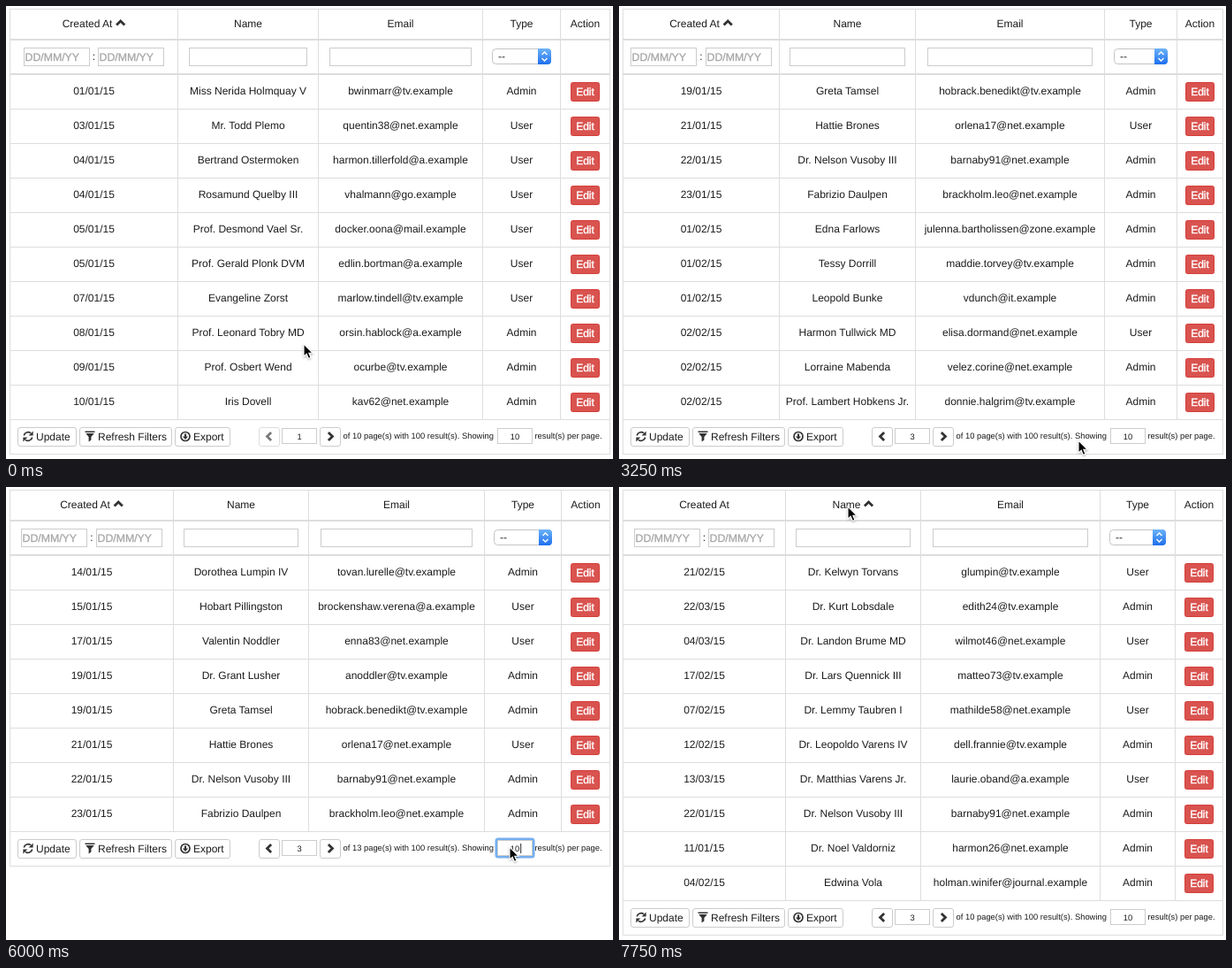
Recreate the animation shown at these times as an HTML page. Size 687 px wide and 512 px high, loop 8000 ms.

```html
<!DOCTYPE html>
<html lang="en">
<head>
<meta charset="utf-8">
<title>Paged user table</title>
<style>
  html, body { margin: 0; width: 100%; height: 100%; overflow: hidden; background: #fff; }
  svg { display: block; font: 12px "Liberation Sans", Arial, sans-serif; text-rendering: geometricPrecision; }
  text { fill: #1c1c1c; }
  .placeholder { fill: #a6a6a6; stroke: #a6a6a6; stroke-width: .3; font-size: 12.3px; }
  .edit { fill: #fff; stroke: #fff; stroke-width: .4; }
  .small { font-size: 9.4px; }
</style>
</head>
<body>
<svg id="stage" width="687" height="512" viewBox="0 0 687 512"></svg>
<script>
const LOOP = 8000, LEFT = 4, RIGHT = 683, TOP = 3, BODY = 77, ROW = 39;

const parse = text => text.trim().split('\n').map(line => {
  const [date, name, email, type] = line.trim().split('|');
  return [date + '/15', name, email, type];
});

const users = parse(`
  01/01|Miss Nerida Holmquay V|bwinmarr@tv.example|Admin
  03/01|Mr. Todd Plemo|quentin38@net.example|User
  04/01|Bertrand Ostermoken|harmon.tillerfold@a.example|User
  04/01|Rosamund Quelby III|vhalmann@go.example|User
  05/01|Prof. Desmond Vael Sr.|docker.oona@mail.example|User
  05/01|Prof. Gerald Plonk DVM|edlin.bortman@a.example|User
  07/01|Evangeline Zorst|marlow.tindell@tv.example|User
  08/01|Prof. Leonard Tobry MD|orsin.hablock@a.example|Admin
  09/01|Prof. Osbert Wend|ocurbe@tv.example|Admin
  10/01|Iris Dovell|kav62@net.example|Admin
  10/01|Mrs. Vera Dunnabey Jr.|tilda.branwick@net.example|User
  10/01|Orrin Tamke|fenner.nilda@a.example|User
  11/01|Dr. Noel Valdorniz|harmon26@net.example|Admin
  12/01|Mrs. Imogen Feldquist|rolf.bontwick@a.example|User
  12/01|Prof. Linna Yarb|dusty.wolkenbrand@tv.example|Admin
  13/01|Marlys Bockle IV|bernard.hoom@box.example|Admin
  14/01|Dorothea Lumpin IV|tovan.lurelle@tv.example|Admin
  15/01|Hobart Pillingston|brockenshaw.verena@a.example|User
  17/01|Valentin Noddler|enna83@net.example|User
  19/01|Dr. Grant Lusher|anoddler@tv.example|Admin
  19/01|Greta Tamsel|hobrack.benedikt@tv.example|Admin
  21/01|Hattie Brones|orlena17@net.example|User
  22/01|Dr. Nelson Vusoby III|barnaby91@net.example|Admin
  23/01|Fabrizio Daulpen|brackholm.leo@net.example|Admin
  01/02|Edna Farlows|julenna.bartholissen@zone.example|Admin
  01/02|Tessy Dorrill|maddie.torvey@tv.example|Admin
  01/02|Leopold Bunke|vdunch@it.example|Admin
  02/02|Harmon Tullwick MD|elisa.dormand@net.example|User
  02/02|Lorraine Mabenda|velez.corine@net.example|Admin
  02/02|Prof. Lambert Hobkens Jr.|donnie.halgrim@tv.example|Admin`);

const byName = [...parse(`
  21/02|Dr. Kelwyn Torvans|glumpin@tv.example|User
  22/03|Dr. Kurt Lobsdale|edith24@tv.example|Admin
  04/03|Dr. Landon Brume MD|wilmot46@net.example|User
  17/02|Dr. Lars Quennick III|matteo73@tv.example|Admin
  07/02|Dr. Lemmy Taubren I|mathilde58@net.example|User
  12/02|Dr. Leopoldo Varens IV|dell.frannie@tv.example|Admin
  13/03|Dr. Matthias Varens Jr.|laurie.oband@a.example|User`),
  users[22], users[12],
  ...parse('04/02|Edwina Vola|holman.winifer@journal.example|Admin')];

// Column edges, then the spans of the name and email filters.
const view = (rows, edges, nameSpan, emailSpan, pages = 10, sorted = 0) =>
  ({ rows, edges: [LEFT, ...edges, RIGHT], nameSpan, emailSpan, pages, sorted });
const midEdges = [189, 342, 541, 628], midName = [201, 331], midEmail = [356, 528];
const page1 = view(users.slice(0, 10), [194, 353, 539, 627], [207, 341], [366, 527]);
const page2 = view(users.slice(10, 20), midEdges, midName, midEmail);
const page3 = view(users.slice(20, 30), [181, 335, 549, 631], [193, 324], [349, 536]);
const eights = view(users.slice(16, 24), midEdges, midName, midEmail, 13);
const sorted = view(byName, [188, 341, 544, 629], [200, 330], [355, 531], 10, 1);

const steps = [
  [0, { view: page1, page: 1, size: '10', busy: false, focus: false, cursor: [337, 382] }],
  [250, { cursor: [339, 396] }],
  [500, { cursor: [346, 430] }],
  [750, { cursor: [357, 472] }],
  [1000, { cursor: [363, 491] }],
  [1250, { page: 2, busy: true }],
  [1500, { cursor: [362, 495] }],
  [1750, { view: page2, busy: false }],
  [2000, { cursor: [367, 495] }],
  [2500, { page: 3, busy: true }],
  [2750, { view: page3, busy: false }],
  [3000, { cursor: [420, 494] }],
  [3250, { cursor: [520, 491] }],
  [3500, { cursor: [565, 490], focus: true }],
  [4000, { size: '8' }],
  [4250, { busy: true, focus: false }],
  [4500, { view: eights, busy: false }],
  [4750, { cursor: [568, 450] }],
  [5000, { cursor: [571, 409] }],
  [5250, { cursor: [570, 407], focus: true }],
  [5500, { size: '1' }],
  [6000, { size: '10' }],
  [6250, { busy: true, focus: false }],
  [6500, { view: page3, busy: false, cursor: [510, 340] }],
  [6750, { cursor: [360, 130] }],
  [7000, { cursor: [265, 30] }],
  [7500, { cursor: [260, 23], busy: true }],
  [7750, { view: sorted, busy: false, cursor: [259, 22] }]
];

const rect = (x, y, w, h, fill) => `<rect x="${x}" y="${y}" width="${w}" height="${h}" fill="${fill}"/>`;
const box = (x, y, w, h, stroke = '#ccc', r = 0, fill = '#fff') =>
  `<rect x="${x + .5}" y="${y + .5}" width="${w - 1}" height="${h - 1}" rx="${r}" fill="${fill}" stroke="${stroke}"/>`;
const text = (x, y, s, style = '') => `<text x="${x}" y="${y}" class="${style}">${s}</text>`;
const centred = (x, y, s, style = '') => `<g text-anchor="middle">${text(x, y, s, style)}</g>`;
const group = (content, opacity) => `<g opacity="${opacity}">${content}</g>`;
const icon = (x, y, content, turn = 0) => `<g transform="translate(${x} ${y}) rotate(${turn})">${content}</g>`;

const chevron = '<path d="M-4.6 2.1L0-2.5 4.6 2.1" fill="none" stroke="#333" stroke-width="2.8"/>';
const halfTurn = '<path d="M-4.7-1A4.8 4.8 0 0 1 3-3.8" fill="none" stroke="#333" stroke-width="1.7"/><path d="M5.6-6V-1H.6Z" fill="#333"/>';
const refreshIcon = halfTurn + `<g transform="rotate(180)">${halfTurn}</g>`;
const filterIcon = '<path d="M-5.5-6H5.5V-4.6H-5.5ZM-4.8-3.6H4.8L1.4 .6V4L-1.4 6V.6Z" fill="#333"/>';
const exportIcon = '<circle r="5" fill="none" stroke="#333" stroke-width="1.7"/><path d="M-1.1-3H1.1V0H3.1L0 3.4-3.1 0H-1.1Z" fill="#333"/>';

function selectBox(centre, colWidth, busy) {
  const w = colWidth - 21, x = Math.floor(centre - w / 2), end = x + w;
  const blue = `<path d="M${end - 15} 48H${end - 4}Q${end} 48 ${end} 52V62Q${end} 66 ${end - 4} 66H${end - 15}Z" fill="url(#blue)"/>`;
  return box(x, 48, w, 18, '#c4c4c4', 4) + (busy ? '' : blue) + text(x + 7, 61, '--') +
    `<path d="M${end - 10.5} 55l3-3 3 3m0 4l-3 3-3-3" fill="none" stroke="${busy ? '#777' : '#fff'}" stroke-width="1.4"/>`;
}

function head({ edges, nameSpan, emailSpan, sorted }, centres, busy) {
  const titles = ['Created At', 'Name', 'Email', 'Type', 'Action'];
  const halfWidths = [28.7, 16];
  let out = titles.map((title, i) => i === sorted
    ? centred(centres[i] - 7.5, 24, title) + icon(centres[i] + halfWidths[i] + 1.5, 19.5, chevron)
    : centred(centres[i], 24, title)).join('');

  const mid = centres[0];
  for (const x of [Math.ceil(mid) - 80, Math.floor(mid) + 5])
    out += box(x, 47, 75, 21) + text(x + 1.5, 61.5, 'DD/MM/YY', 'placeholder');
  out += centred(mid, 61, ':');
  for (const [a, b] of [nameSpan, emailSpan]) out += box(a, 47, b - a, 21);
  return out + selectBox(centres[3], edges[4] - edges[3], busy);
}

function body(rows, centres) {
  return rows.map((row, r) => {
    const y = BODY + r * ROW, x = Math.round(centres[4] - 17);
    return row.map((s, i) => centred(centres[i], y + 23, s)).join('') +
      box(x, y + 9, 33, 22, '#d43f3a', 2, '#d9534f') +
      centred(x + 16.5, y + 24, 'Edit', 'edit');
  }).join('');
}

function grid(edges, foot) {
  const line = '#ddd', width = RIGHT - LEFT + 1;
  let out = rect(LEFT, 37, width, 2, line) + rect(LEFT, 76, width, 2, line) + rect(LEFT, TOP, width, 1, line);
  for (let y = BODY + ROW; y <= foot + ROW; y += ROW) out += rect(LEFT, y, width, 1, line);
  edges.forEach((x, i) => {
    const bottom = i % 5 ? foot : foot + ROW;
    out += rect(x, TOP, 1, bottom - TOP, line);
  });
  return out;
}

function footer({ view, page, size, busy, focus }, y) {
  const button = (x, w, glyph, label = '', off = busy, turn = 0) => group(
    box(x, y + 9, w, 22, '#ccc', 2.5) + icon(x + 12, y + 19.5, glyph, turn) + text(x + 21, y + 24, label), off ? .65 : 1);
  const ring = focus
    ? `<rect x="555" y="${y + 9}" width="42" height="20" rx="2" fill="none" stroke="#74aef0" stroke-width="3"/>` : '';
  const caret = focus ? rect(577 + size.length * 2.6, y + 14, 1, 11, '#222') : '';
  return button(13, 67, refreshIcon, 'Update') +
    button(83, 105, filterIcon, 'Refresh Filters') +
    button(191, 63, exportIcon, 'Export') +
    button(286, 24, chevron, '', busy || page === 1, -90) +
    box(312, y + 10, 40, 18) + centred(332, y + 22.5, page, 'small') +
    button(355, 24, chevron, '', busy, 90) +
    text(381.5, y + 22, `of ${view.pages} page(s) with 100 result(s). Showing`, 'small') +
    ring + box(556, y + 10, 40, 18) + centred(576, y + 22.5, size, 'small') + caret +
    text(598.5, y + 22, 'result(s) per page.', 'small');
}

const pointer = ([x, y]) => `<path transform="translate(${x} ${y})" filter="url(#shadow)"
  d="M0 0V14.2L3.2 11.2 5.4 16.4 8 15.3 5.8 10.3H10.2Z" fill="#000" stroke="#fff" stroke-width="1.1"/>`;

const defs = `<defs>
  <linearGradient id="blue" x2="0" y2="1"><stop stop-color="#6cb3fa"/><stop offset="1" stop-color="#1e6fee"/></linearGradient>
  <filter id="shadow" x="-50%" y="-50%" width="200%" height="200%">
    <feDropShadow dx="0" dy="1" stdDeviation="1" flood-opacity=".35"/></filter>
</defs>`;

function draw(time) {
  const state = Object.assign({}, ...steps.filter(([at]) => at <= time).map(step => step[1]));
  const { view, busy, cursor } = state;
  const centres = view.edges.slice(1).map((x, i) => (x + view.edges[i]) / 2 + .5);
  const foot = BODY + view.rows.length * ROW;
  const table = grid(view.edges, foot) + head(view, centres, busy) +
    body(view.rows, centres) + footer(state, foot);
  return defs + group(table, busy ? .5 : 1) + pointer(cursor);
}

const stage = document.getElementById('stage');
let shown = -1;
function tick() {
  const time = performance.now() % LOOP;
  const current = steps.filter(([at]) => at <= time).length;
  if (current !== shown) {
    stage.innerHTML = draw(time);
    shown = current;
  }
  requestAnimationFrame(tick);
}
tick();
</script>
</body>
</html>
```
